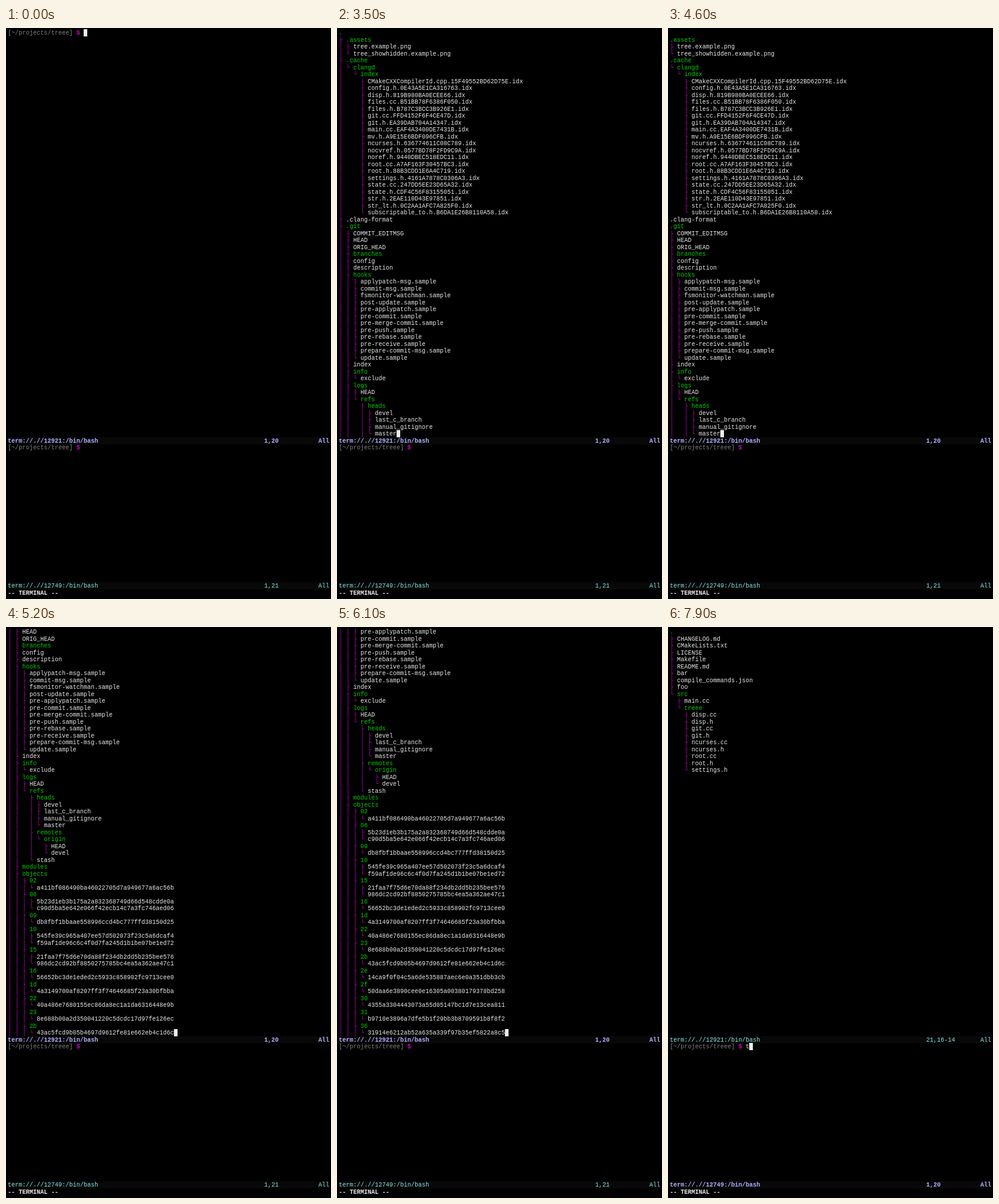
Write an HTML page that moves like this. It is 540 by 950 pixels and loops after 8 s.

```html
<!DOCTYPE html>
<html lang="en">
<head>
<meta charset="utf-8">
<title>Terminal tree browser</title>
<style>
html, body { margin: 0; width: 100%; height: 100%; overflow: hidden; background: #000; }
#screen { position: relative; width: 540px; height: 950px; overflow: hidden; }
.row, .bar, #cursor { position: absolute; }
.row { left: 3px; font: 10px/13px "Liberation Mono", monospace; white-space: pre; color: #e8e8e8; }
.bar { left: 3px; width: 534px; height: 12px; background: #080808; }
#cursor { width: 6px; height: 12px; background: #eee; }
.dir { color: #00cd00; }
.guide { color: #cd00cd; }
.path { color: #7f7f7f; }
.sign { color: #cd00cd; font-weight: bold; }
.active { color: #afafff; font-weight: bold; }
.idle { color: #87e5e5; }
.mode { font-weight: bold; }
</style>
</head>
<body>
<div id="screen"></div>
<script>
const LOOP = 8000, ROWS = 82, VIEW = 59, CW = 6, RH = 11.5;

// One entry per line, depth by leading spaces, directories end in "/".
const head = `./
 .assets/
  tree.example.png
  tree_showhidden.example.png
 .cache/
  clangd/
   index/
    CMakeCXXCompilerId.cpp.15F49552BD62D75E.idx
    config.h.0E43A5E1CA316763.idx
    disp.h.819B980BA0ECEE66.idx
    files.cc.B51BB78F6386F050.idx
    files.h.B787C3BCC3B926E1.idx
    git.cc.FFD4152F6F4CE47D.idx
    git.h.EA39DAB704A14347.idx
    main.cc.EAF4A3400DE7431B.idx
    mv.h.A9E15E6BDF096CFB.idx
    ncurses.h.636774611C08C789.idx
    nocvref.h.0577BD78F2FD9C9A.idx
    noref.h.9440DBEC518EDC11.idx
    root.cc.A7AF163F30457BC3.idx
    root.h.88B3CDD1E6A4C719.idx
    settings.h.4161A7878C0306A3.idx
    state.cc.247DD5EE23D65A32.idx
    state.h.CDF4C56F83155051.idx
    str.h.2EAE110D43E97851.idx
    str_lt.h.0C2AA1AFC7A825F0.idx
    subscriptable_to.h.B6DA1E26B8110A58.idx
 .clang-format
 .git/
  COMMIT_EDITMSG
  HEAD
  ORIG_HEAD
  branches/
  config
  description
  hooks/
   applypatch-msg.sample
   commit-msg.sample
   fsmonitor-watchman.sample
   post-update.sample
   pre-applypatch.sample
   pre-commit.sample
   pre-merge-commit.sample
   pre-push.sample
   pre-rebase.sample
   pre-receive.sample
   prepare-commit-msg.sample
   update.sample
  index
  info/
   exclude
  logs/
   HEAD
   refs/
    heads/
     devel
     last_c_branch
     manual_gitignore
     master
    remotes/
     origin/
      HEAD
      devel
    stash
  modules/
  objects/
   02/
    a411bf086490ba46022705d7a949677a6ac56b
   06/
    5b23d1eb3b175a2a832368749d66d548cdde0a
    c90d5ba5e642e066f42ecb14c7a3fc746aed06
   09/
    db8fbf1bbaae558996ccd4bc777ffd38150d25
   10/
    545fe39c965a407ee57d502073f23c5a6dcaf4
    f59af1de96c6c4f0d7fa245d1b1be07be1ed72
   15/
    21faa7f75d6e70da88f234db2dd5b235bee576
    986dc2cd92bf8850275785bc4ea5a362ae47c1
   16/
    56652bc3de1eded2c5933c858902fc9713cee0
   1d/
    4a3149700af8207ff3f74646685f23a30bfbba
   22/
    40a486e7680155ec86da8ec1a1da6316448e9b
   23/
    8e688b00a2d350041220c5dcdc17d97fe126ec
   2b/
    43ac5fcd9b05b4697d9612fe81e662eb4c1d6c
   2e/
    14ca9f0f04c5a6de535887aec6e0a351dbb3cb
   2f/
    50daa6e3890cee0e16305a00380179378bd258
   30/
    4355a3304443073a55d05147bc1d7e13cea811
   31/
    b9710e3896a7dfe5b1f29bb3b8709591b8f8f2
   36/
    31914e6212ab52a635a339f97b35ef5822a8c5`;

const tail = `  refs/
 .gitignore
 CHANGELOG.md
 CMakeLists.txt
 LICENSE
 Makefile
 README.md
 bar
 compile_commands.json
 foo
 src/
  main.cc
  treee/
   disp.cc
   disp.h
   git.cc
   git.h
   ncurses.cc
   ncurses.h
   root.cc
   root.h
   settings.h`;

let seed = 7;
const rand = n => (seed = (seed * 16807) % 2147483647) % n;
const hex = n => Array.from({ length: n }, () => rand(16).toString(16)).join("");

function moreObjects() {
  const out = [];
  for (let id = 0x38; id < 0xff; id += 1 + rand(7)) {
    out.push(`   ${id.toString(16)}/`, "    " + hex(38));
    if (rand(4) === 0) out.push("    " + hex(38));
  }
  return out;
}

let top1 = "";
const nodes = [...head.split("\n"), ...moreObjects(), ...tail.split("\n")].map(line => {
  const name = line.trimStart(), depth = line.length - name.length;
  if (depth === 1) top1 = name;
  return { depth, dir: name.endsWith("/"), name: name.replace("/", ""), hidden: top1.startsWith(".") };
});

// Adds the guide lines, walking up from the last entry.
function layout(list) {
  const more = [];
  return list.slice().reverse().map(({ depth, dir, name }) => {
    let guide = "";
    for (let d = 1; d < depth; d++) guide += more[d] ? "│ " : "  ";
    if (depth) guide += more[depth] ? "├ " : "└ ";
    more[depth] = true;
    more.length = depth + 1;
    return { guide, dir, name };
  }).reverse();
}

const trees = {
  plain: layout(nodes.filter(n => !n.depth || !n.hidden)),
  closed: layout(nodes.filter(n => n.depth < 2 || !n.hidden)),
  full: layout(nodes)
};

const steps = [[0, { typed: 0, tree: "", x: 0, y: 0, low: false, mode: true, input: 0 }]];
const at = (ms, change) => steps.push([ms, { ...steps[steps.length - 1][1], ...change }]);
const run = (start, key, values) => values.forEach((v, i) => at(start + i * 100, { [key]: v }));

at(900, { typed: 1 });
run(1100, "typed", [2, 3, 4, 5]);
at(1600, { tree: "plain" });
at(2600, { tree: "closed" });
at(3500, { tree: "full" });
run(3900, "x", [1, 2, 3, 4, 5, 4, 3, 2]);
run(4800, "x", [1, 0]);
run(5100, "y", [20, 30, 40, 50, 60, 70, 80, 60, 50]);
run(6100, "y", [40, 30, 20, 10, 0]);
at(6800, { tree: "plain" });
at(7200, { low: true, mode: false });
at(7500, { mode: true });
at(7900, { input: 1 });

const screen = document.getElementById("screen");
const rowTop = i => Math.round(2 + i * RH);
function add(cls, top) {
  const el = document.createElement("div");
  el.className = cls;
  el.style.top = top + "px";
  return screen.appendChild(el);
}
[59, 80].forEach(i => add("bar", rowTop(i)));
const cursor = add("", 0);
cursor.id = "cursor";
const rows = Array.from({ length: ROWS }, (_, i) => add("row", rowTop(i)));

function put(i, ...parts) {
  rows[i].replaceChildren(...parts.map(([text, cls]) => {
    const span = document.createElement("span");
    span.className = cls || "";
    span.textContent = text;
    return span;
  }));
}

function moveCursor(row, col) {
  cursor.style.left = 3 + col * CW + "px";
  cursor.style.top = rowTop(row) + "px";
}

const prompt = (i, text) => put(i, ["[~/projects/treee] ", "path"], ["$", "sign"], [" " + text]);
const status = (i, id, pos, on) =>
  put(i, [`term://.//${id}:/bin/bash`.padEnd(71) + pos.padEnd(15) + "All", on ? "active" : "idle"]);

function entry(i, { guide, dir, name }, x) {
  const cut = x - guide.length;
  if (cut > 0) name = name.length - cut > 2 ? "< " + name.slice(cut + 2) : "";
  put(i, [guide.slice(x), "guide"], [name, dir ? "dir" : ""]);
}

function draw(s) {
  for (let i = 0; i < VIEW; i++) put(i);
  if (s.tree) {
    const shown = trees[s.tree].slice(s.y, s.y + VIEW);
    shown.forEach((n, i) => entry(i, n, s.x));
    const last = shown[shown.length - 1];
    moveCursor(shown.length - 1, last.guide.length + last.name.length - s.x);
  } else {
    prompt(0, "treee".slice(0, s.typed));
    moveCursor(0, 21 + s.typed);
  }
  status(59, 12921, s.low ? "21,16-14" : "1,20", !s.low);
  prompt(60, "treee".slice(0, s.input));
  status(80, 12749, s.low ? "1,20" : "1,21", s.low);
  put(81, [s.mode ? "-- TERMINAL --" : "", "mode"]);
  if (s.low) moveCursor(60, 21 + s.input);
}

let current = -1;
function tick() {
  const t = performance.now() % LOOP;
  let n = steps.length - 1;
  while (steps[n][0] > t) n--;
  if (n !== current) draw(steps[current = n][1]);
  requestAnimationFrame(tick);
}
tick();
</script>
</body>
</html>
```
